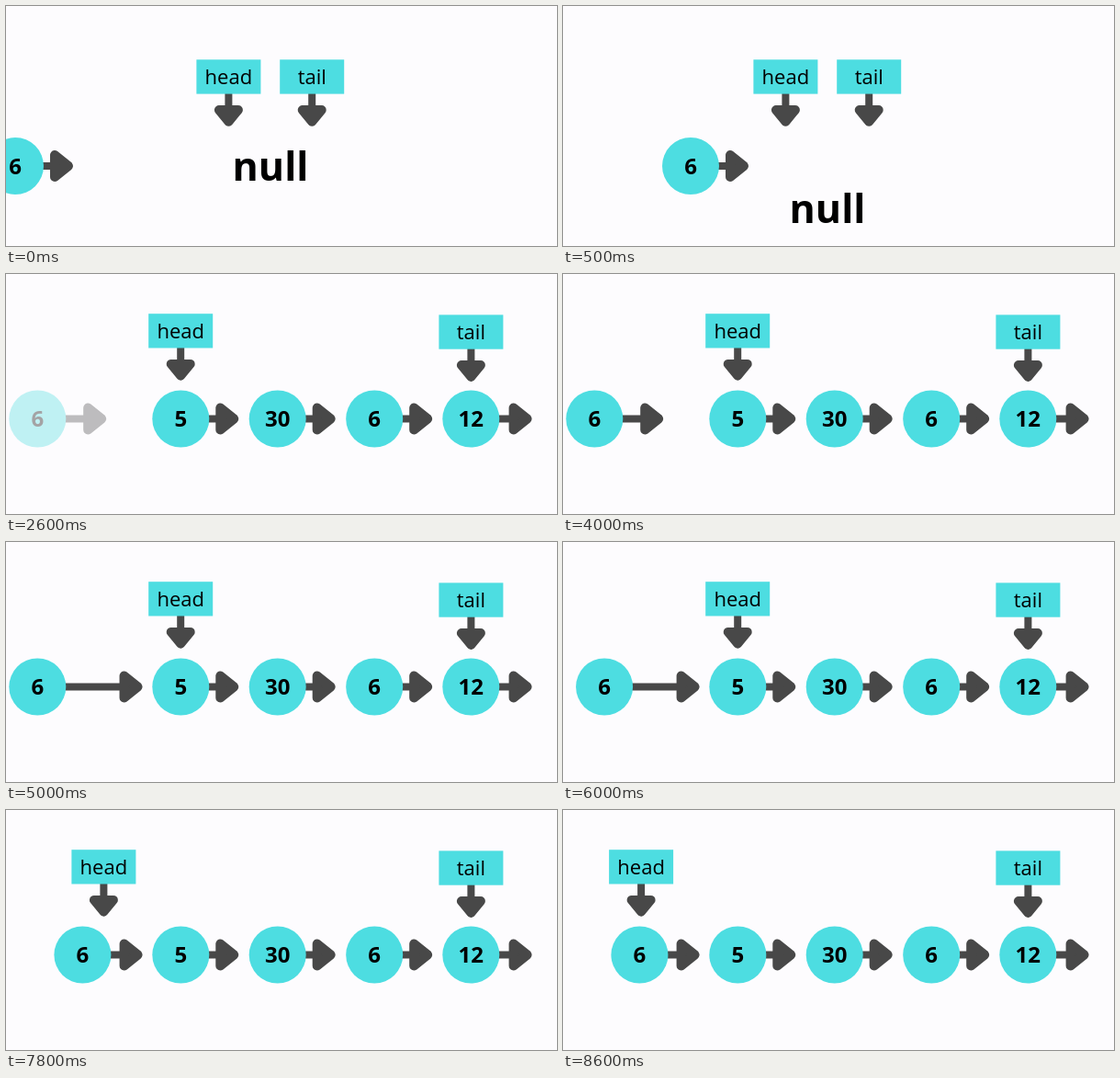
Write an HTML page that moves like this. It is 600 px wide and 261 px high and loops after 8.7 s.

```html
<!DOCTYPE html>
<html lang="en">
<head>
<meta charset="utf-8">
<title>Linked list: insert at head</title>
<style>
  html, body { margin: 0; width: 100%; height: 100%; overflow: hidden; background: #fdfcfe; }
  svg { display: block; width: 600px; height: 261px; }
  text { font-family: "Open Sans", "Noto Sans", sans-serif; text-anchor: middle; fill: #000; }
  .value { font-size: 24px; font-weight: 700; }
  .label { font-size: 22px; }
  .null { font-size: 43px; font-weight: 700; }
  .fill { fill: #4ddde1; }
  .shaft { stroke: #484848; stroke-width: 8; }
  .tip { fill: #484848; stroke: #484848; stroke-width: 10; stroke-linejoin: round; }
</style>
</head>
<body>
<svg id="stage" viewBox="0 0 600 261"></svg>
<script>
const LOOP = 8700, STEP = 100, CUT = 2600;
const stage = document.getElementById("stage");

function add(parent, tag, attrs = {}, text = "") {
  const el = document.createElementNS("http://www.w3.org/2000/svg", tag);
  for (const key in attrs) el.setAttribute(key, attrs[key]);
  el.textContent = text;
  parent.appendChild(el);
  return el;
}

const place = (el, x, y) => el.setAttribute("transform", `translate(${x} ${y})`);

// A circle with a value and an arrow; reach is the distance from centre to arrow tip.
function makeNode(parent, value) {
  const group = add(parent, "g");
  const shaft = add(group, "line", { class: "shaft", x1: 20, y1: 0, y2: 0 });
  const tip = add(group, "path", { class: "tip", d: "M-20-12V12L-5 0Z" });
  add(group, "circle", { class: "fill", r: 31 });
  add(group, "text", { class: "value", y: 8.7 }, value);
  return (x, y, reach) => {
    place(group, x, y);
    place(tip, reach, 0);
    shaft.setAttribute("x2", reach - 20);
    return group;
  };
}

// A labelled box with an arrow below, placed by its top centre.
function makePointer(parent, name) {
  const group = add(parent, "g");
  add(group, "line", { class: "shaft", x1: 0, x2: 0, y1: 36, y2: 55 });
  add(group, "path", { class: "tip", d: "M-10.5 54.7H10.5L0 67.5Z" });
  add(group, "rect", { class: "fill", x: -35, width: 70, height: 37.3 });
  add(group, "text", { class: "label", y: 27 }, name);
  return (x, y) => place(group, x, y);
}

const emptyList = add(stage, "g");
const nullText = add(emptyList, "text", { class: "null" }, "null");
const firstNode = makeNode(emptyList, "6");

const fullList = add(stage, "g");
[["5", 190.3, 63], ["30", 295.7, 63], ["6", 401.2, 63], ["12", 506.3, 66.3]]
  .forEach(([value, x, reach]) => makeNode(fullList, value)(x, 157.5, reach));
const newNode = makeNode(fullList, "6");

const head = makePointer(stage, "head");
const tail = makePointer(stage, "tail");

function ease(t, start, duration = 1000) {
  const p = Math.min(1, Math.max(0, (t - start) / duration));
  return p < 0.5 ? 4 * p ** 3 : 1 - 4 * (1 - p) ** 3;
}

const mix = (a, b, p) => a + (b - a) * p;

function draw(t) {
  const inserted = t >= CUT;
  emptyList.setAttribute("display", inserted ? "none" : "inline");
  fullList.setAttribute("display", inserted ? "inline" : "none");

  if (!inserted) {
    const p = ease(t, 0);
    firstNode(mix(10, 268, p), 174, 63);
    place(nullText, 288, mix(190, 281, p));
    head(242.4, 58.3);
    tail(333.2, 58.3);
    return;
  }

  const x = mix(34.3, 83.4, ease(t, 5620));
  const tipX = mix(109.2, 148.6, ease(t, 4070));
  const opacity = Math.min(1, mix(0.35, 1, (t - CUT) / 600));
  newNode(x, 157.5, tipX - x).setAttribute("opacity", opacity);
  head(mix(190.2, 85.1, ease(t, 7170)), 43.2);
  tail(506.4, 44.4);
}

function frame(now) {
  draw(Math.floor((now % LOOP) / STEP) * STEP);
  requestAnimationFrame(frame);
}

draw(0);
requestAnimationFrame(frame);
</script>
</body>
</html>
```
